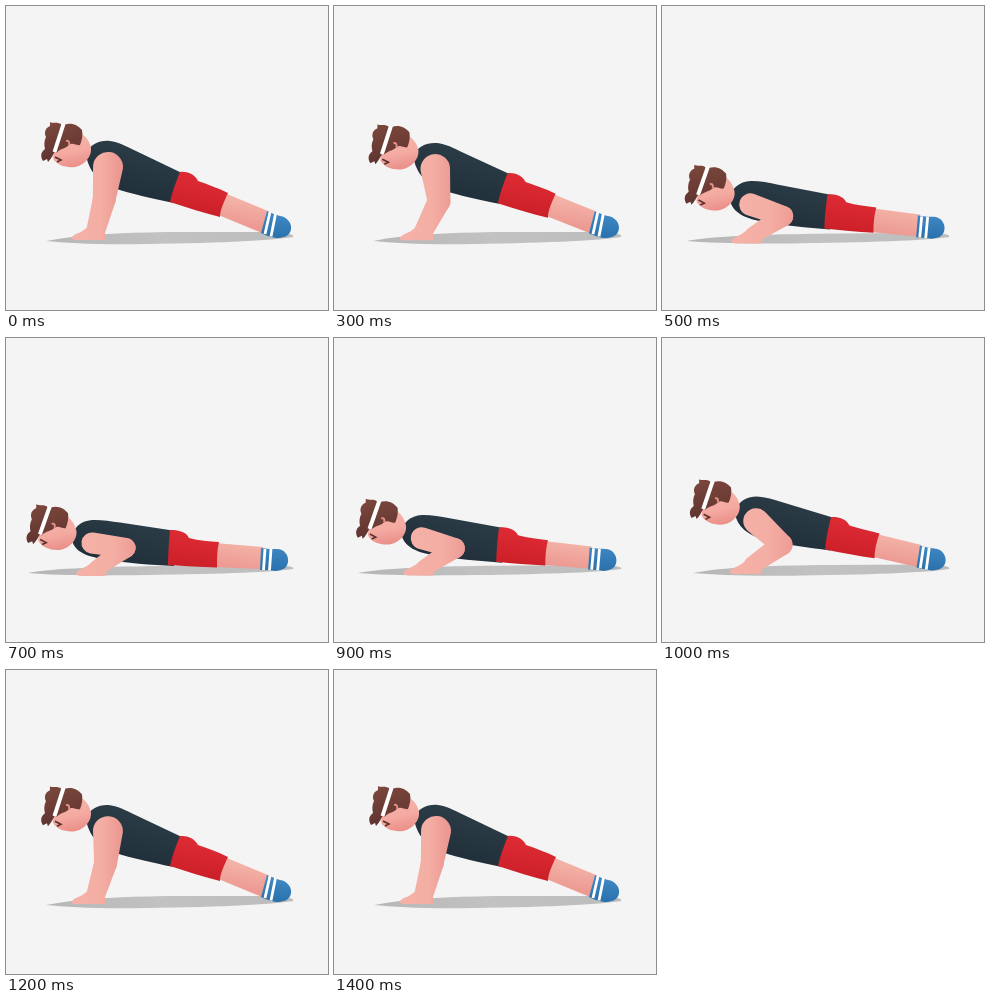
These frames come from a looping animation (322x304 px, 1.5 s). An HTML page with a canvas:

```html
<!DOCTYPE html>
<html lang="en">
<head>
<meta charset="utf-8">
<title>Push-up</title>
<style>
  html, body { margin: 0; width: 100%; height: 100%; overflow: hidden; background: #f4f4f4; }
  canvas { display: block; }
</style>
</head>
<body>
<canvas width="322" height="304"></canvas>
<script>
const ctx = document.querySelector('canvas').getContext('2d');
const LOOP = 1500, STEP = 100;
const SKIN = '#f5b1a7';

// Each body part has a raised and a lowered outline.
const parts = {
  shadow: [
    'M40 235C75 228 115 227 160 226L272 226C283 227 289 229 287 231C270 234 220 237 140 238C95 239 60 237 40 235Z',
    'M22 235C50 230 95 229 150 228L272 227C283 228 289 229 287 231C270 234 220 236 140 237C85 238 45 237 22 235Z'],
  leg: [
    'M216 186L262 205L256 227L210 208Z',
    'M209 205L257 209L254 231L208 229Z'],
  sock: [
    'M261 205C266 207 270 209 274 210C281 211 286 217 285 223C284 230 278 232 270 232C264 231 259 229 255 227Z',
    'M255 210C260 211 266 211 271 211C278 211 283 217 282 224C281 230 277 232 270 233C264 232 259 232 254 232Z'],
  stripes: [
    'M264 206L259 228M269.5 208L265 230.5',
    'M259 211L257.5 232M265 211L263.5 232.5'],
  shorts: [
    'M174 166C180 165 189 168 192 175C203 179 212 182 222 187C218 196 214 204 214 211C198 207 182 202 164 196C166 186 170 176 174 166Z',
    'M164 192C171 192 180 193 183 200C193 203 203 203 213 204C211 212 211 220 211 229.5C195 229 178 228 162 227C162 215 163 203 164 192Z'],
  torso: [
    'M80 148C84 138 94 134 104 135C112 136 120 140 130 145L178 168L168 197C145 192 125 188 108 182C94 177 82 165 80 148Z',
    'M66 200C67 190 74 183 86 182C94 181.5 104 183 114 184.5L170 193L168 228C145 227 120 225 98 221C80 219 66 212 66 200Z'],
  hand: [
    'M82 220C77 227 69 227 66 231C65 233 67 234 70 234L99 234L99 224Z',
    'M86 224C80 230 72 231 70 235C70 237 72 238 75 238L99 238L103 229Z']
};

const mix = (a, b, k) => a + (b - a) * k;

function blend([up, down], k) {
  const ends = down.match(/[\d.]+/g);
  let i = 0;
  return new Path2D(up.replace(/[\d.]+/g, n => mix(+n, +ends[i++], k).toFixed(2)));
}

function gradient(x0, y0, x1, y1, ...colors) {
  const g = ctx.createLinearGradient(x0, y0, x1, y1);
  colors.forEach((c, i) => g.addColorStop(i / (colors.length - 1), c));
  return g;
}

function fill(path, color) {
  ctx.fillStyle = color;
  ctx.fill(path);
}

function stroke(path, color, width) {
  ctx.strokeStyle = color;
  ctx.lineWidth = width;
  ctx.stroke(path);
}

// Tapered capsule from circle a to circle b.
function limb(a, b, color) {
  const angle = Math.atan2(b.y - a.y, b.x - a.x), q = Math.PI / 2;
  const path = new Path2D();
  path.arc(a.x, a.y, a.r, angle + q, angle + 3 * q);
  path.arc(b.x, b.y, b.r, angle - q, angle + q);
  path.closePath();
  fill(path, color);
}

function drawArm(k) {
  const s = { x: mix(102, 86, k), y: mix(161, 205, k), r: mix(15, 10.5, k) };
  const w = { x: mix(90, 91, k), y: mix(224, 230, k), r: mix(9.5, 8, k) };
  const stretch = 8 * k * (1 - k);
  const upper = mix(32, 34, k) + stretch, fore = mix(32.3, 35, k) + stretch;
  const dx = w.x - s.x, dy = w.y - s.y, d = Math.hypot(dx, dy);
  const along = (upper ** 2 - fore ** 2 + d * d) / (2 * d);
  const out = Math.sqrt(Math.max(0, upper ** 2 - along ** 2));
  const elbow = {
    x: s.x + (dx * along + dy * out) / d,
    y: s.y + (dy * along - dx * out) / d,
    r: mix(11.5, 10, k)
  };
  const skin = gradient(w.x - 12, 0, elbow.x + 14, 0, SKIN, '#f4aea4', '#ec9993');
  fill(blend(parts.hand, k), skin);
  limb(elbow, w, skin);
  limb(s, elbow, skin);
}

function drawHead(k) {
  ctx.save();
  ctx.translate(mix(68, 53.5, k), mix(142, 193, k));
  ctx.rotate(0.03 * k);
  ctx.translate(-68, -142);
  fill(new Path2D('M56 122L48 144L47 152C50 159 60 162 69 161C79 159 86 150 85 142C83 133 77 127 70 125Z'),
    gradient(60, 132, 66, 161, SKIN, '#f4aaa1', '#ea8f89'));
  fill(new Path2D('M56 119C52 115 47 118 44 116L44 120C39 122 38 127 40 131C38 135 38 139 39 143C35 146 34 150 37 155L41 153L42 156C45 153 47 149 50 143Z'),
    gradient(38, 120, 50, 152, '#7b473b', '#5f3430'));
  fill(new Path2D('M58 119C65 116 72 119 76 124C77 129 76 134 74 139C70 140 67 136 63 139C59 143 55 142 50 147L49 144Z'),
    gradient(58, 118, 66, 142, '#78453b', '#693a33'));
  stroke(new Path2D('M57.5 118L48.5 146'), '#fff', 4);
  stroke(new Path2D('M60 135Q64 134 63 139'), '#e28f86', 2);
  stroke(new Path2D('M49 151L55 154L51 156'), '#56302b', 1.6);
  ctx.restore();
}

function drawPose(k) {
  ctx.fillStyle = '#f4f4f4';
  ctx.fillRect(0, 0, 322, 304);
  fill(blend(parts.shadow, k), gradient(30, 0, 288, 0, '#b6b6b6', '#c2c2c2', '#bcbcbc'));
  fill(blend(parts.leg, k), gradient(235, mix(194, 206, k), 231, mix(218, 230, k), '#f4b2a7', '#ec9a92'));
  fill(blend(parts.sock, k), gradient(268, 208, 266, 234, '#3f88c4', '#286fab'));
  stroke(blend(parts.stripes, k), '#fff', 2.8);
  fill(blend(parts.torso, k), gradient(130, mix(145, 186, k), 118, mix(188, 224, k), '#2b3b45', '#202f39'));
  fill(blend(parts.shorts, k), gradient(194, mix(174, 199, k), 189, mix(205, 229, k), '#dc2a33', '#cc2029'));
  drawArm(k);
  drawHead(k);
}

function ease(t, from, to) {
  const p = Math.min(1, Math.max(0, (t - from) / (to - from)));
  return p < 0.5 ? 4 * p ** 3 : 1 - 4 * (1 - p) ** 3;
}

function frame() {
  const t = Math.floor(performance.now() % LOOP / STEP) * STEP;
  drawPose(ease(t, 200, 650) - ease(t, 750, 1250));
  requestAnimationFrame(frame);
}
frame();
</script>
</body>
</html>
```
